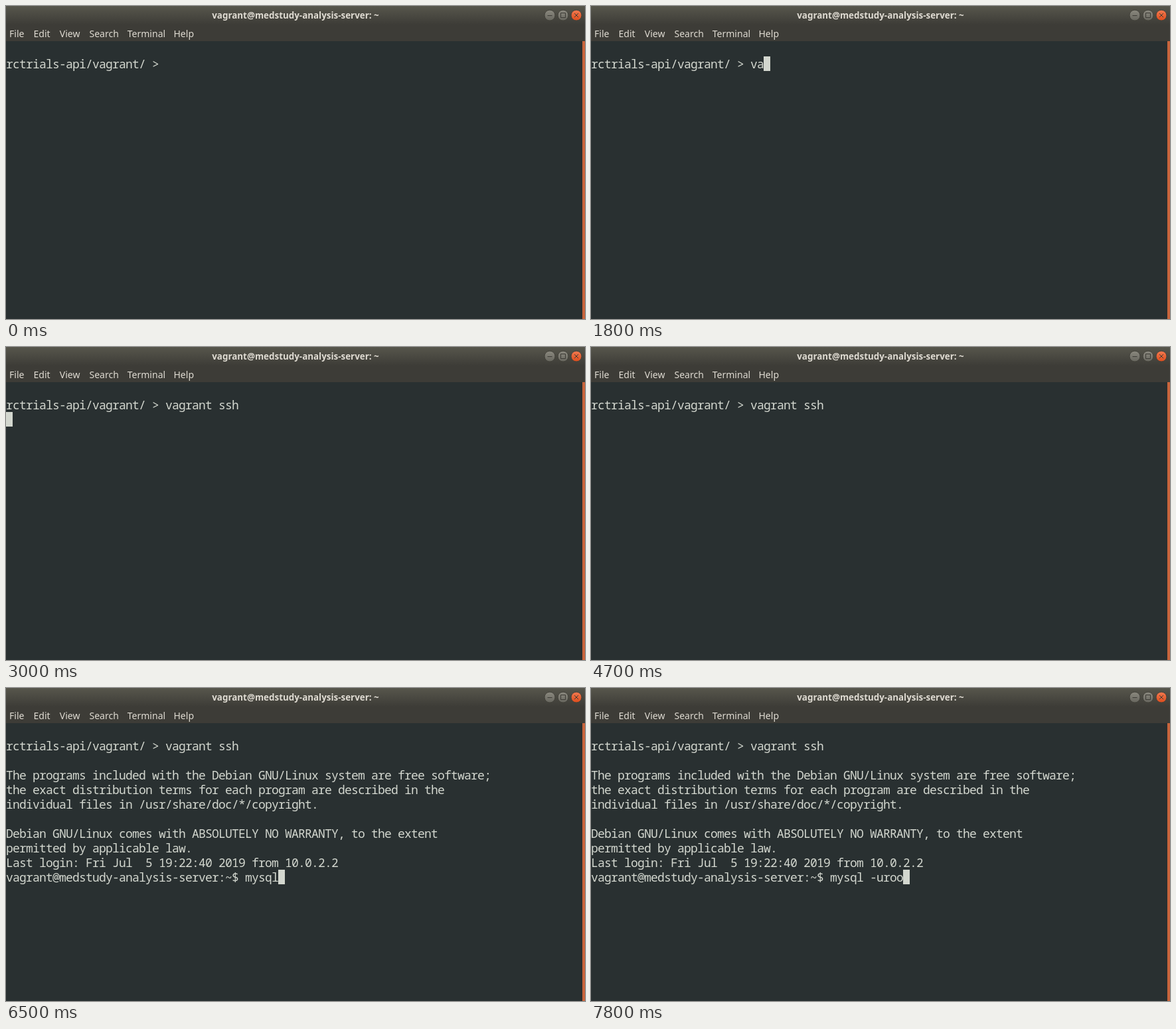
Write an HTML page that moves like this. It is 872x472 px and loops after 8000 ms.

```html
<!DOCTYPE html>
<html lang="en">
<head>
<meta charset="utf-8">
<title>Terminal session</title>
<style>
  html, body { margin: 0; width: 100%; height: 100%; overflow: hidden; background: #293031; }
  svg { display: block; width: 872px; height: 472px; }
  text { white-space: pre; }
  .title { font: bold 13.4px "Noto Sans", "Open Sans", sans-serif; fill: #dfdbd2; text-anchor: middle; }
  .menu { font: 14px "Noto Sans", "Open Sans", sans-serif; fill: #dfdbd2; }
  .term { font: 18px "Noto Sans Mono", "DejaVu Sans Mono", monospace; letter-spacing: -0.8px; fill: #d3d7cf; }
  .glyph { fill: none; stroke: #3c3b35; stroke-width: 1; }
</style>
</head>
<body>
<svg viewBox="0 0 872 472" xmlns="http://www.w3.org/2000/svg">
  <defs>
    <linearGradient id="bar" x2="0" y2="1">
      <stop offset="0" stop-color="#57564c"/>
      <stop offset="1" stop-color="#3d3c37"/>
    </linearGradient>
    <linearGradient id="grey" x2="0" y2="1">
      <stop offset="0" stop-color="#8b897f"/>
      <stop offset="1" stop-color="#67665e"/>
    </linearGradient>
    <linearGradient id="orange" x2="0" y2="1">
      <stop offset="0" stop-color="#f27a50"/>
      <stop offset="1" stop-color="#dd4c1c"/>
    </linearGradient>
  </defs>
  <rect width="872" height="472" fill="#293031"/>
  <rect width="872" height="28" fill="url(#bar)"/>
  <rect y="28" width="872" height="25" fill="#3d3c37"/>
  <rect x="868" y="53" width="4" height="419" fill="#c8643c"/>
  <text class="title" id="title" x="436" y="19"></text>
  <g stroke="#42413a">
    <circle cx="819" cy="14" r="8" fill="url(#grey)"/>
    <circle cx="839" cy="14" r="8" fill="url(#grey)"/>
    <circle cx="859" cy="14" r="8" fill="url(#orange)"/>
  </g>
  <path class="glyph" d="M815.5 14.5h7M835.5 10.5h7v7h-7zM856 11l6 6M862 11l-6 6"/>
  <g class="menu" id="menu"></g>
  <g class="term" id="rows"></g>
  <rect id="cursor" width="10" height="22" fill="#d3d7cf"/>
</svg>
<script>
const LOOP = 8000, CELL = 10, ROW = 22, TOP = 76;
const host = "vagrant@medstudy-analysis-server";
const localPrompt = "rctrials-api/vagrant/ > ";
const remotePrompt = host + ":~$ ";
const localCmd = "vagrant ssh";
const remoteCmd = "mysql -uroo";
const banner = [
  "",
  "The programs included with the Debian GNU/Linux system are free software;",
  "the exact distribution terms for each program are described in the",
  "individual files in /usr/share/doc/*/copyright.",
  "",
  "Debian GNU/Linux comes with ABSOLUTELY NO WARRANTY, to the extent",
  "permitted by applicable law.",
  "Last login: Fri Jul  5 19:22:40 2019 from 10.0.2.2"
];

// [start ms, stage, typed characters, cursor visible]
const LOCAL = 0, WAIT = 1, REMOTE = 2;
const steps = [
  [0, LOCAL, 0, false],
  [1000, LOCAL, 0, true],
  [1100, LOCAL, 0, false],
  [1400, LOCAL, 0, true],
  [1500, LOCAL, 1, true],
  [1800, LOCAL, 2, true],
  [2000, LOCAL, 5, true],
  [2200, LOCAL, 6, true],
  [2300, LOCAL, 8, true],
  [2600, LOCAL, 9, true],
  [2700, LOCAL, 11, true],
  [3000, WAIT, 0, true],
  [4000, WAIT, 0, false],
  [4100, WAIT, 0, true],
  [4700, WAIT, 0, false],
  [5300, REMOTE, 0, true],
  [6000, REMOTE, 1, true],
  [6200, REMOTE, 3, true],
  [6400, REMOTE, 4, true],
  [6500, REMOTE, 5, true],
  [6700, REMOTE, 7, true],
  [7000, REMOTE, 8, true],
  [7700, REMOTE, 9, true],
  [7800, REMOTE, 11, true]
];

const byId = id => document.getElementById(id);
function addText(parent, x, y, str = "") {
  const el = document.createElementNS("http://www.w3.org/2000/svg", "text");
  el.setAttribute("x", x);
  el.setAttribute("y", y);
  el.textContent = str;
  parent.appendChild(el);
  return el;
}

byId("title").textContent = host + ": ~";
Object.entries({ File: 5, Edit: 41.5, View: 80.8, Search: 125.5, Terminal: 182.8, Help: 252.5 })
  .forEach(([name, x]) => addText(byId("menu"), x, 47, name));
const rows = Array.from({ length: 10 }, (_, i) => addText(byId("rows"), 0, TOP + ROW * i + 18));
const cursor = byId("cursor");

function screenLines(stage, typed) {
  if (stage === LOCAL) return [localPrompt + localCmd.slice(0, typed)];
  const first = localPrompt + localCmd;
  if (stage === WAIT) return [first, ""];
  return [first, ...banner, remotePrompt + remoteCmd.slice(0, typed)];
}

let shown;
function draw(ms) {
  const step = steps.findLast(s => s[0] <= ms);
  if (step === shown) return;
  shown = step;
  const [, stage, typed, visible] = step;
  const lines = screenLines(stage, typed);
  rows.forEach((row, i) => { row.textContent = lines[i] || ""; });
  const last = lines.length - 1;
  cursor.setAttribute("x", lines[last].length * CELL);
  cursor.setAttribute("y", TOP + last * ROW);
  cursor.setAttribute("visibility", visible ? "visible" : "hidden");
}

const start = performance.now();
function tick() {
  draw((performance.now() - start) % LOOP);
  requestAnimationFrame(tick);
}
tick();
</script>
</body>
</html>
```
